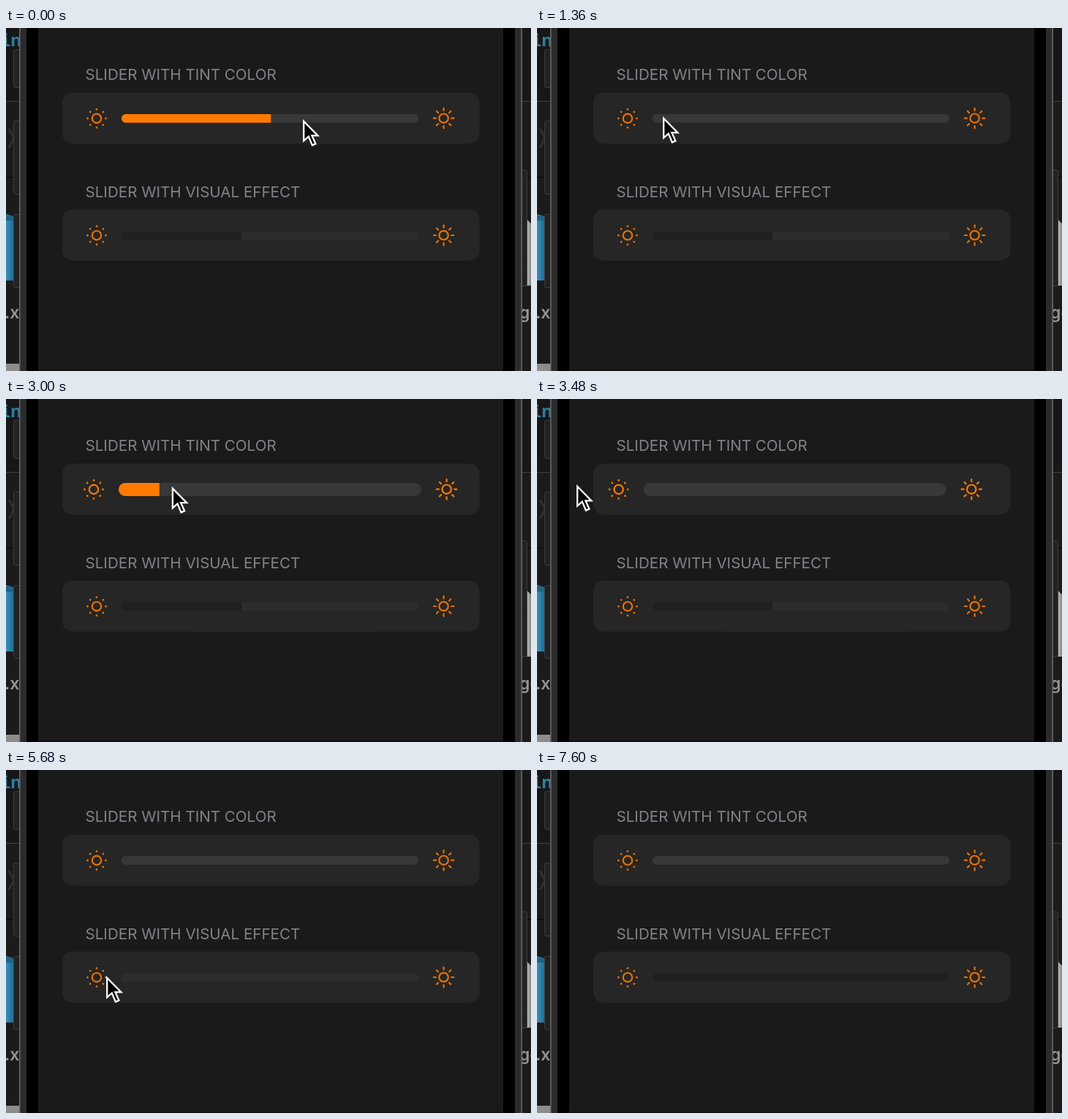
Recreate the animation shown at these times as an HTML page. Size 718 px wide and 470 px high, loop 7.68 s.

```html
<!DOCTYPE html>
<html lang="en">
<head>
<meta charset="utf-8">
<title>Sliders</title>
<style>
  html, body { margin: 0; width: 100%; height: 100%; overflow: hidden; background: #1a1a1a; }
  svg { display: block; width: 718px; height: 470px; }
  .label { font: 400 20.6px Inter, "Liberation Sans", sans-serif; fill: #838288; }
  .file { font: 600 23px Inter, "Liberation Sans", sans-serif; fill: #949494; }
  .code { font: 600 24px "Noto Sans Mono", "DejaVu Sans Mono", monospace; fill: #2f7f9c; }
</style>
</head>
<body>
<svg viewBox="0 0 718 470">
  <defs>
    <linearGradient id="folder" x2="1" y2="0">
      <stop offset="0" stop-color="#3c8db5"/><stop offset="1" stop-color="#1f6f9a"/>
    </linearGradient>
    <linearGradient id="page" x2="1" y2="0">
      <stop offset="0" stop-color="#c4c4c4"/><stop offset="1" stop-color="#858585"/>
    </linearGradient>
  </defs>

  <!-- desktop behind the phone -->
  <rect width="718" height="470" fill="#1b1b1c"/>
  <rect width="718" height="100" fill="#17171a"/>
  <path d="M0 100.5H718" stroke="#424243"/>
  <path d="M0 204.5H718" stroke="#060606"/>
  <text class="code" x="-8" y="25">in</text>
  <path d="M4 138L11 151L4 164" fill="none" stroke="#303031" stroke-width="3"/>
  <path d="M0 255L10 258V346H0Z" fill="url(#folder)"/>
  <path d="M0 256L10 259V264H0Z" fill="#1d6488"/>
  <text class="file" x="-2" y="398">.x</text>
  <rect y="460" width="19" height="10" fill="#8c8c8c"/>
  <path d="M712 262L718 268V353H712Z" fill="url(#page)"/>
  <text class="file" x="702" y="398">ge</text>

  <!-- phone -->
  <g fill="#222223" stroke="#3c3c3d">
    <rect x="10.5" y="29.5" width="14" height="52" rx="2"/>
    <rect x="10.5" y="127.5" width="14" height="100" rx="2"/>
    <rect x="10.5" y="255.5" width="14" height="100" rx="2"/>
    <rect x="699" y="194.5" width="13.5" height="159" rx="2"/>
  </g>
  <rect x="18" width="688" height="470" fill="#2b2b2c"/>
  <path d="M18.8 0V470M705.2 0V470" stroke="#676768" stroke-width="1.6"/>
  <rect x="28" width="668" height="470" fill="#000"/>
  <rect x="44" width="636" height="470" fill="#1a1a1a"/>
  <rect x="44" y="468" width="636" height="2" fill="#111"/>
  <text class="label" x="108.5" y="71">SLIDER WITH TINT COLOR</text>
  <text class="label" x="108.5" y="232">SLIDER WITH VISUAL EFFECT</text>
  <g id="sliders"></g>
  <path id="cursor" d="M1.2 1.8V28.5L7.8 22.6L12.9 34.6L17.4 32.6L12.4 21.4H20.4Z" fill="#000" stroke="#fff" stroke-width="2.3"/>
</svg>

<script>
const LOOP = 7680, STEP = 40, LEFT = 158, WIDTH = 406, ORANGE = '#ff7a00';
const NS = 'http://www.w3.org/2000/svg';
const clamp = (v, lo = 0, hi = 1) => Math.min(hi, Math.max(lo, v));
const smooth = p => p * p * (3 - 2 * p);
const mix = (a, b, p) => a + (b - a) * p;

function add(parent, tag, attrs) {
  const node = parent.appendChild(document.createElementNS(NS, tag));
  set(node, attrs);
  return node;
}
function set(node, attrs) {
  for (const name in attrs) node.setAttribute(name, attrs[name]);
}

// Pointer path: time, x, y
const path = [
  [0, 406, 126], [240, 406, 126], [1000, 172, 122], [1540, 172, 122],
  [2200, 667, 128], [2480, 667, 128], [3280, 54, 118], [3600, 54, 118],
  [4240, 323, 266], [4480, 323, 266], [5200, 137, 283], [5760, 137, 283],
  [6400, 688, 284], [6680, 688, 284], [7080, 740, 286]
];
function pointer(t) {
  const i = path.findIndex(k => k[0] > t);
  if (i < 0) return path[path.length - 1].slice(1);
  const [a, b] = [path[i - 1], path[i]];
  const p = smooth((t - a[0]) / (b[0] - a[0]));
  return [mix(a[1], b[1], p), mix(a[2], b[2], p)];
}

function addIcon(parent, isMax) {
  const g = add(parent, 'g', { fill: 'none', stroke: ORANGE, 'stroke-width': 2.2, 'stroke-linecap': 'round' });
  add(g, 'circle', { r: 6.2 });
  for (let a = 0; a < 360; a += 45) {
    const spin = { transform: `rotate(${a})` };
    if (isMax) add(g, 'path', { d: 'M10.6 0H13.7', ...spin });
    else add(g, 'circle', { cx: 12.5, r: 1.4, fill: ORANGE, stroke: 'none', ...spin });
  }
  return g;
}

function makeSlider(y, value, trackColor, fillColor, drags) {
  const root = add(document.getElementById('sliders'), 'g', {});
  add(root, 'rect', { x: 77, y: y - 35.5, width: 570.5, height: 70, rx: 14, fill: '#262626' });
  const id = 'track' + y;
  const shape = add(add(root, 'clipPath', { id }), 'rect', {});
  const bar = add(root, 'g', { 'clip-path': `url(#${id})` });
  add(bar, 'rect', { x: 120, y: y - 12, width: 490, height: 24, fill: trackColor });
  const fill = add(bar, 'rect', { x: 120, y: y - 12, height: 24, fill: fillColor });
  const low = addIcon(root, false), high = addIcon(root, true);

  return t => {
    let level = value, active = 0, pull = 0;
    for (const [press, release] of drags) {
      if (t < press) break;
      const raw = level + (pointer(Math.min(t, release))[0] - pointer(press)[0]) / WIDTH;
      level = clamp(raw);
      active = smooth(clamp((t - press) / 200)) * (1 - smooth(clamp((t - release) / 240)));
      const over = (raw - level) * WIDTH;
      pull = Math.sign(over) * (1 - Math.exp(-Math.abs(over) / 22)) * active;
    }
    const shift = 8.4 * pull, grow = 4 * active;
    const x = LEFT + shift - grow, width = WIDTH + 2 * grow, height = 11.6 + 6.4 * active;
    set(shape, { x, y: y - height / 2, width, height, rx: mix(5.5, 9, active) });
    set(fill, { width: level > 0 ? x + width * level - 120 : 0 });
    const opacity = mix(.9, 1, active);
    set(low, { opacity, transform: `translate(${124 + shift - grow} ${y})` });
    set(high, { opacity, transform: `translate(${598.6 + shift + grow} ${y - .2}) scale(${1 + .2 * Math.max(0, pull)})` });
  };
}

const sliders = [
  makeSlider(123.9, .503, '#383838', ORANGE, [[160, 1080], [1440, 3600]]),
  makeSlider(284.2, .404, '#2c2c2c', '#202021', [[4400, 5300], [5720, 6680]])
];
const cursor = document.getElementById('cursor');

function draw(now) {
  const t = Math.floor(now % LOOP / STEP) * STEP;
  sliders.forEach(update => update(t));
  set(cursor, { transform: `translate(${pointer(t)})` });
}

const start = performance.now();
function tick() {
  draw(performance.now() - start);
  requestAnimationFrame(tick);
}
tick();
</script>
</body>
</html>
```
